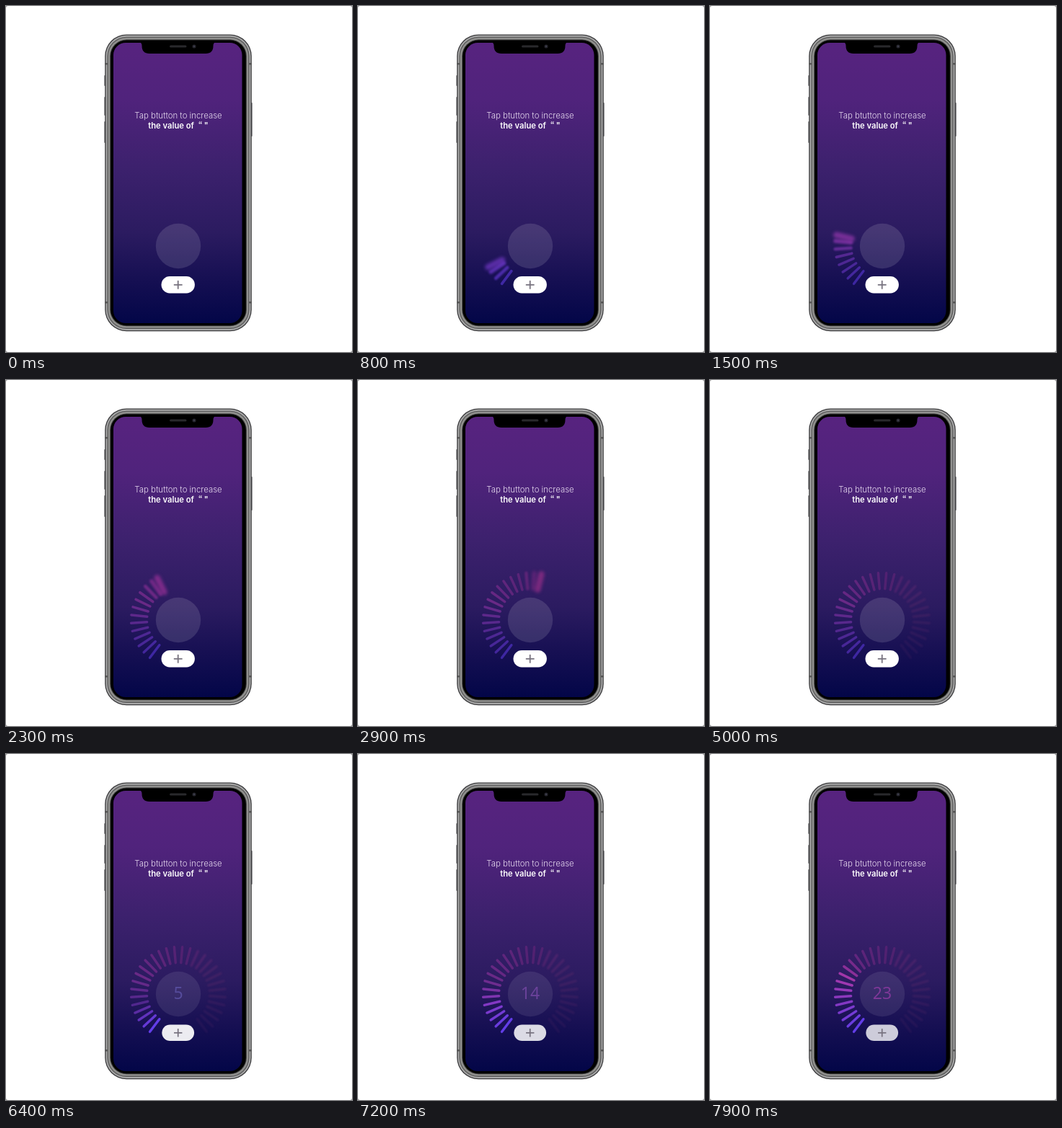
An HTML page with a canvas for the animation above (8000 ms loop, 480 by 480 pixels).

```html
<!DOCTYPE html>
<html lang="en">
<head>
<meta charset="utf-8">
<title>Dial counter</title>
<style>
  html, body { margin: 0; width: 100%; height: 100%; overflow: hidden; background: #fff; }
  #stage { position: relative; width: 480px; height: 480px; overflow: hidden; }
  canvas { position: absolute; left: 0; top: 0; }
  .text {
    position: absolute; left: 139px; width: 200px; text-align: center; white-space: pre;
    font: 300 11.4px/16px Inter, sans-serif; color: #e6d9ef;
  }
  #lead { top: 144.4px; }
  #strong { top: 158.4px; font-weight: 600; font-size: 11.2px; color: #fff; }
  #strong span { font-family: "Noto Sans CJK SC", "Noto Sans CJK", sans-serif; line-height: 0; }
  #count { top: 315px; font: 300 23px/32px "Noto Sans", sans-serif; }
</style>
</head>
<body>
<div id="stage">
  <canvas id="canvas" width="480" height="480"></canvas>
  <div class="text" id="lead">Tap btutton to increase</div>
  <div class="text" id="strong">the value of<span lang="zh-CN">“</span> "</div>
  <div class="text" id="count"></div>
</div>
<script>
const LOOP = 8000, STEP = 100;
const TICKS = 30, FIRST_ANGLE = 127, SWEEP = 286;
const CENTER = { x: 239, y: 333 };
const ctx = document.getElementById('canvas').getContext('2d');
const count = document.getElementById('count');

const clamp = (v, lo = 0, hi = 1) => Math.min(hi, Math.max(lo, v));
const ramp = (t, from, to) => clamp((t - from) / (to - from));
const mix = (a, b, k) => a + (b - a) * k;

// Interpolates [position, ...values] stops.
function along(stops, p) {
  let i = 1;
  while (i < stops.length - 1 && p > stops[i][0]) i++;
  const [a, b] = [stops[i - 1], stops[i]];
  const k = ramp(p, a[0], b[0]);
  return a.slice(1).map((v, n) => mix(v, b[n + 1], k));
}

// position, red, green, blue, resting opacity
const TICK_STOPS = [
  [0, 100, 62, 235, 0.52],
  [4, 140, 60, 205, 0.46],
  [8, 178, 58, 178, 0.46],
  [15, 165, 45, 145, 0.27],
  [21, 175, 66, 124, 0.15],
  [29, 150, 60, 120, 0.11],
];

function box(x, y, w, h, r, fill) {
  ctx.beginPath();
  ctx.roundRect(x, y, w, h, r);
  ctx.fillStyle = fill;
  ctx.fill();
}

function disc(x, y, r, fill) {
  ctx.beginPath();
  ctx.arc(x, y, r, 0, Math.PI * 2);
  ctx.fillStyle = fill;
  ctx.fill();
}

function vertical(y0, y1, stops) {
  const g = ctx.createLinearGradient(0, y0, 0, y1);
  stops.forEach(([p, color]) => g.addColorStop(p, color));
  return g;
}

// Phone outline shrunk by d on every side.
function body(d, fill) {
  box(137.2 + d, 39.5 + d, 203.6 - 2 * d, 411.7 - 2 * d, 30 - d, fill);
}

function drawPhone() {
  ctx.fillStyle = '#999';
  ctx.fillRect(0, 0, 480, 480);
  box(0, 0, 480, 480, 3, '#fff');

  for (const [x, y, h] of [[136.2, 96, 15], [136.2, 126, 26], [136.2, 160, 30], [339.8, 134, 47]])
    box(x, y, 2, h, 1, '#77777a');

  body(0, '#3a3a3c');
  body(1.3, '#a9a9a9');
  for (const y of [79, 410]) {
    ctx.fillStyle = '#555';
    ctx.fillRect(137.2, y, 203.6, 2.5);
  }
  body(3.2, '#5c5c5c');
  body(4.6, '#91918f');
  body(7, '#3c3c3c');
  body(8, '#000');

  box(149, 51, 178.5, 389, 17, vertical(51, 440, [
    [0, '#57237f'], [0.2, '#50237c'], [0.45, '#3c216d'],
    [0.68, '#2b1b60'], [0.85, '#150f52'], [1, '#030648'],
  ]));

  ctx.beginPath();
  ctx.moveTo(185, 50);
  ctx.quadraticCurveTo(188.5, 51, 188.5, 55);
  ctx.quadraticCurveTo(188.5, 66, 199, 66);
  ctx.lineTo(277, 66);
  ctx.quadraticCurveTo(287.5, 66, 287.5, 55);
  ctx.quadraticCurveTo(287.5, 51, 291, 50);
  ctx.fillStyle = '#000';
  ctx.fill();
  box(227, 54.5, 23.5, 3, 1.5, '#29292c');
  disc(261, 56, 2.6, '#25252b');
  disc(261, 56, 1.2, '#3d3d4c');
}

function drawRay(index, [r, g, b], alpha, width, blur) {
  const a = (FIRST_ANGLE + SWEEP * index / (TICKS - 1)) * Math.PI / 180;
  const point = d => [CENTER.x + d * Math.cos(a), CENTER.y + d * Math.sin(a)];
  ctx.save();
  ctx.globalAlpha = clamp(alpha);
  ctx.filter = `blur(${blur.toFixed(2)}px)`;
  ctx.strokeStyle = `rgb(${r}, ${g}, ${b})`;
  ctx.lineWidth = width;
  ctx.lineCap = 'round';
  ctx.beginPath();
  ctx.moveTo(...point(43.5));
  ctx.lineTo(...point(65.5));
  ctx.stroke();
  ctx.restore();
}

function drawDial(t, value) {
  const elapsed = Math.max(0, t - 0.3);
  const head = 5.2 * elapsed + 0.35 * elapsed ** 2;
  const lit = value * 0.4;

  for (let i = 0; i < TICKS; i++) {
    const age = head - i;
    if (age <= 0) continue;
    const [r, g, b, rest] = along(TICK_STOPS, i);
    const glow = clamp(1 - age / 3);
    const shine = value ? clamp((lit + 2 - i) / 3.5) : 0;
    const alpha = clamp(age / 0.7) * (rest + 0.2 * glow + 0.46 * shine);
    const blur = 0.4 + 1.8 * glow + 0.7 * ramp(i, 13, 20);
    drawRay(i, [r, g, b], alpha, 3.5 + 2.5 * glow, blur);
  }

  const headAlpha = 0.62 * clamp(head) * clamp((TICKS - head) / 2);
  if (headAlpha > 0) drawRay(head, along(TICK_STOPS, head), headAlpha, 8.5, 1.9);
}

function drawButton(t) {
  const scale = mix(1, 0.965, ramp(t, 5.8, 6.4));
  ctx.save();
  ctx.translate(238.7, 386.8);
  ctx.scale(scale, scale);
  ctx.globalAlpha = mix(1, 0.79, ramp(t, 5.5, 7.9));
  box(-23.2, -11.7, 46.4, 23.4, 11.7, '#fff');
  ctx.globalAlpha = 1;
  ctx.fillStyle = '#77727f';
  ctx.fillRect(-5.9, -0.9, 11.8, 1.8);
  ctx.fillRect(-0.9, -5.9, 1.8, 11.8);
  ctx.restore();
}

function draw(t) {
  const value = Math.round(12 * Math.max(0, t - 6));
  drawPhone();
  drawDial(t, value);
  disc(CENTER.x, CENTER.y, 31.2, `rgba(255, 255, 255, ${mix(0.12, 0.085, ramp(t, 5.4, 6.4))})`);
  drawButton(t);

  const warm = ramp(value, 5, 23);
  count.textContent = value;
  count.style.opacity = ramp(t, 5.8, 6.3);
  count.style.color = `rgb(${mix(86, 126, warm)}, ${mix(76, 56, warm)}, ${mix(156, 152, warm)})`;
}

function tick() {
  const now = performance.now() % LOOP;
  draw(Math.floor(now / STEP) * STEP / 1000);
  requestAnimationFrame(tick);
}
tick();
</script>
</body>
</html>
```
